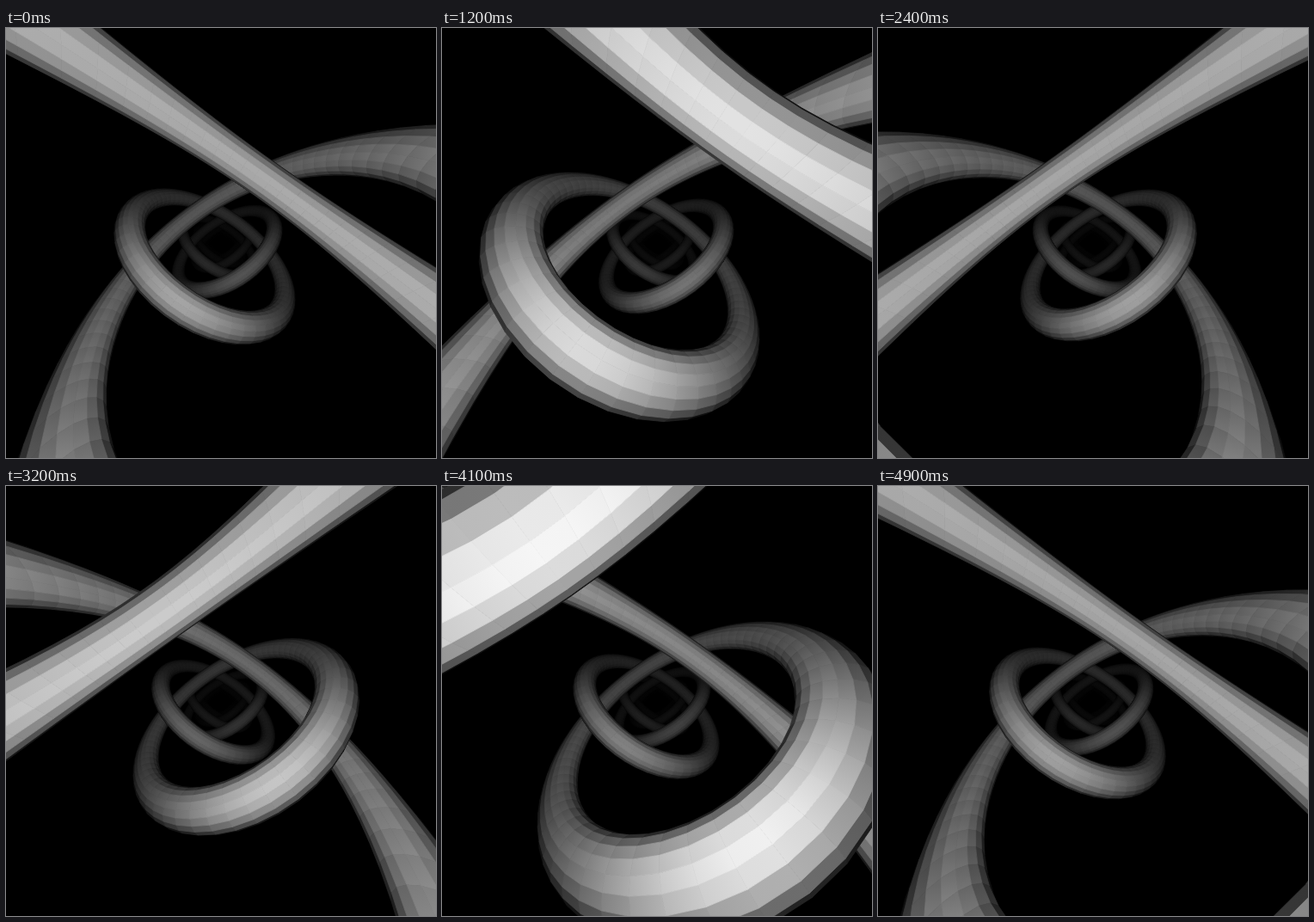
An HTML page with a canvas for the animation above (5 s loop, 500x500 px).

```html
<!DOCTYPE html>
<html lang="en">
<head>
<meta charset="utf-8">
<title>Ring chain</title>
<style>
  html, body { margin: 0; width: 100%; height: 100%; overflow: hidden; background: #000; }
  canvas { display: block; width: 500px; height: 500px; }
</style>
</head>
<body>
<canvas id="stage" width="500" height="500"></canvas>
<script>
const ctx = document.getElementById('stage').getContext('2d');
const HALF = 250, FOCAL = 166.5, NEAR = 0.05;
const RADIUS = 1.125, TUBE = 0.125, SEGMENTS = 64, SIDES = 20;
const LEAD = 0.08, RINGS = 10;
const STEP_MS = 100, STEPS = 50;
const TAU = Math.PI * 2;

// Ring plane: normal N, in-plane axes U and V (y down, z away from the camera).
const H = Math.SQRT1_2;
const N = [-0.5, H, 0.5], U = [H, 0, H], V = [0.5, H, -0.5];

const mix = (a, b, c) => [0, 1, 2].map(i => a * U[i] + b * V[i] + c * N[i]);
const midpoint = (p, q) => p.map((v, i) => (v + q[i]) / 2);

function surface(i, j) {
  const a = i / SEGMENTS * TAU, b = j / SIDES * TAU;
  const d = RADIUS + TUBE * Math.cos(b);
  return mix(d * Math.cos(a), d * Math.sin(a), TUBE * Math.sin(b));
}

function normal(i, j) {
  const a = i / SEGMENTS * TAU, b = j / SIDES * TAU;
  return mix(Math.cos(b) * Math.cos(a), Math.cos(b) * Math.sin(a), Math.sin(b));
}

// Each facet keeps the middles of its two ends along the ring for shading.
const facets = [];
for (let i = 0; i < SEGMENTS; i++) {
  for (let j = 0; j < SIDES; j++) {
    const pts = [surface(i, j), surface(i + 1, j), surface(i + 1, j + 1), surface(i, j + 1)];
    const ends = [midpoint(pts[0], pts[3]), midpoint(pts[1], pts[2])];
    facets.push({ pts, ends, mid: midpoint(...ends), n: normal(i + 0.5, j + 0.5) });
  }
}

function collect(list, depth, flip) {
  for (const facet of facets) {
    const { pts, mid, n } = facet;
    const z = mid[2] + depth;
    if (n[0] * mid[0] + n[1] * mid[1] + n[2] * z >= 0) continue;
    if (pts.some(p => p[2] + depth < NEAR)) continue;
    list.push({ facet, depth, flip, dist: Math.hypot(mid[0], mid[1], z) });
  }
}

// Light sits at the camera and fades with distance.
function shade([x, y, z], n, depth) {
  z += depth;
  const dist = Math.hypot(x, y, z);
  const facing = Math.max(0, -(n[0] * x + n[1] * y + n[2] * z) / dist);
  const v = Math.min(255, Math.round(facing * 375 * Math.exp(-0.73 * dist)));
  return `rgb(${v},${v},${v})`;
}

function project([x, y, z], depth, flip) {
  const scale = FOCAL / (z + depth);
  return [HALF + flip * x * scale, HALF + y * scale];
}

function paint({ facet: { pts, ends, n }, depth, flip }) {
  const [from, to] = ends.map(p => project(p, depth, flip));
  const fill = ctx.createLinearGradient(...from, ...to);
  ends.forEach((p, i) => fill.addColorStop(i, shade(p, n, depth)));
  ctx.beginPath();
  for (const p of pts) ctx.lineTo(...project(p, depth, flip));
  ctx.closePath();
  ctx.fillStyle = ctx.strokeStyle = fill;
  ctx.fill();
  ctx.stroke();
}

function draw(step) {
  const travel = step / STEPS * 2;
  const first = Math.floor(travel) - 1;
  const list = [];
  for (let k = first; k < first + RINGS; k++) {
    collect(list, k + LEAD - travel, k & 1 ? -1 : 1);
  }
  list.sort((a, b) => b.dist - a.dist);

  ctx.fillStyle = '#000';
  ctx.fillRect(0, 0, 2 * HALF, 2 * HALF);
  ctx.lineWidth = 0.8;
  ctx.lineJoin = 'round';
  list.forEach(paint);
}

const start = performance.now();
let shown = -1;
function tick() {
  const step = Math.floor((performance.now() - start) / STEP_MS) % STEPS;
  if (step !== shown) draw(shown = step);
  requestAnimationFrame(tick);
}
tick();
</script>
</body>
</html>
```
